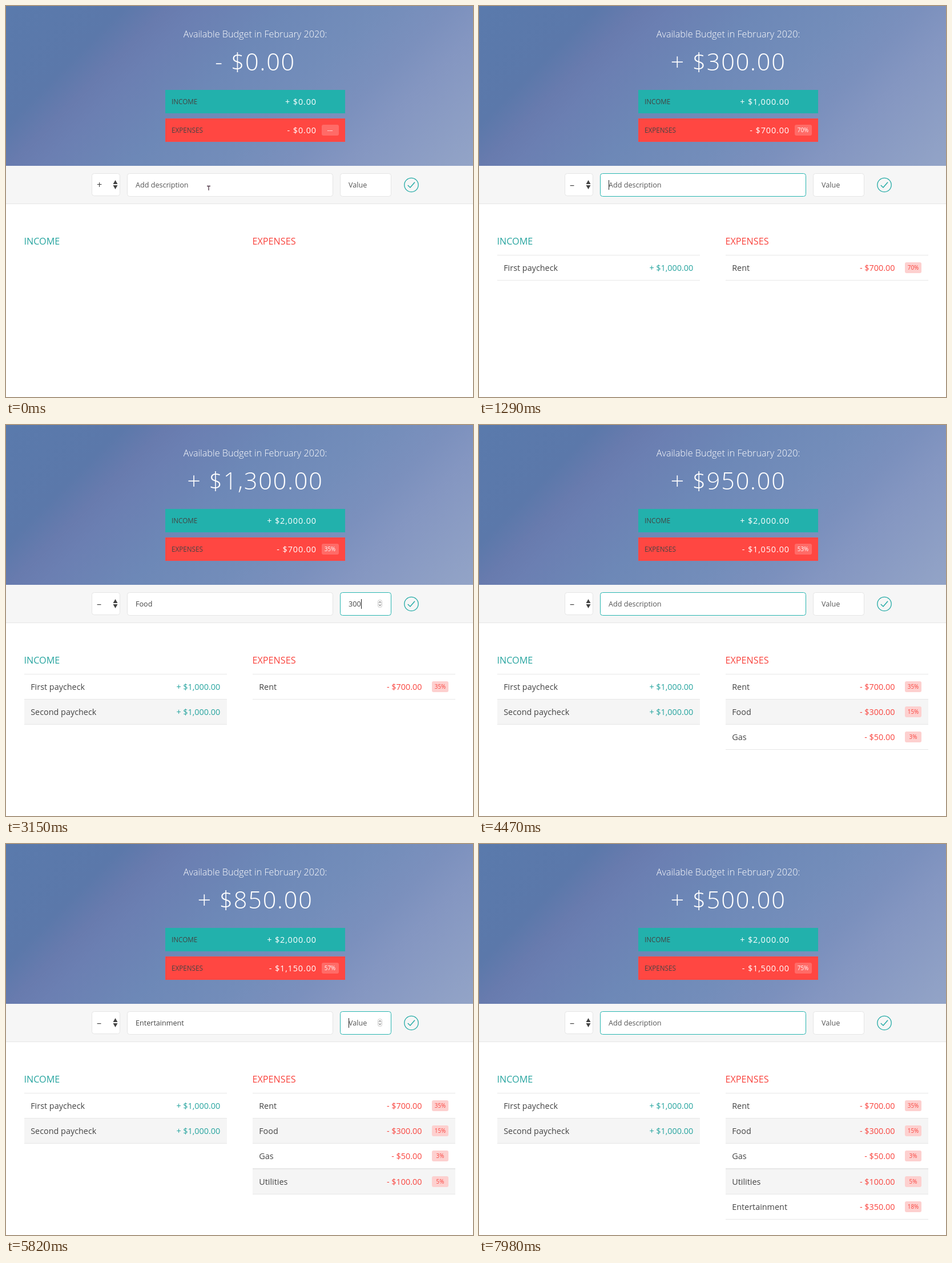
Animation of 818 by 685 pixels, one loop 8 s. Source, as an HTML page:

```html
<!DOCTYPE html>
<html lang="en">
<head>
<meta charset="utf-8">
<title>Budget</title>
<style>
* { box-sizing: border-box; }
html, body { margin: 0; width: 100%; height: 100%; overflow: hidden; background: #fff; }
body { position: relative; font: 400 14.4px/20px "Open Sans", sans-serif; color: #444; }
div, b, svg { position: absolute; white-space: pre; }
b { font-weight: 400; }
#stage { left: 0; top: 0; width: 818px; height: 685px; overflow: hidden; }
.top {
  left: 0; top: 0; width: 818px; height: 280px; color: #fff;
  background: linear-gradient(135deg, #5a7aac 0, #5b78aa 19%, #687bae 26%, #6b7fb2 31%, #6d88b7 45%, #738dba 60%, #7b90bd 71%, #8496c1 79%, #93a4c7 100%);
}
.title { left: 236.5px; width: 400px; top: 39px; text-align: center; font-size: 16.2px; font-weight: 300; }
#budget { left: 136.5px; width: 600px; top: 67px; line-height: 60px; text-align: center; font-size: 41.4px; font-weight: 300; letter-spacing: 1.8px; }
.bar { left: 279px; width: 315px; height: 41px; line-height: 41px; }
.bar .label { left: 11px; font-size: 11.7px; color: #444; }
.bar .sum { right: 50px; letter-spacing: .9px; }
.badge { width: 29px; height: 19px; line-height: 19px; border-radius: 3px; text-align: center; font-size: 9.9px; }
.bar .badge { left: 273.5px; top: 11px; width: 30px; background: #fff3; }
.form { left: 0; top: 280px; width: 818px; height: 67px; background: #f6f6f6; border-bottom: 1px solid #e5e5e5; }
.field { height: 41px; top: 293px; line-height: 39px; padding-left: 14px; background: #fff; border: 1px solid #e5e5e5; border-radius: 4.5px; font-size: 12.6px; color: #444; }
.field i { color: #555; font-style: normal; }
.field u { display: inline-block; width: 1px; height: 17px; margin-right: -1px; vertical-align: -4px; background: #222; }
.focus { border-color: #28b5b0; }
#sign { left: 150px; width: 50px; height: 40px; line-height: 38px; padding-left: 8px; font-size: 16.2px; }
#description { left: 212px; width: 361px; }
#value { left: 585px; width: 90px; }
.heading { top: 402px; font-size: 16.2px; }
.inc { color: #26a49f; }
.exp { color: #f9443e; }
.row { width: 355.5px; height: 45px; line-height: 43px; border: solid #e7e7e7; border-width: 1px 0; }
.row:nth-child(even) { background: #f5f5f5; }
.row .name { left: 11.7px; }
.row .amount { right: 11.7px; }
.row .exp.amount { right: 58.5px; }
.row .badge { right: 12px; top: 12px; background: #fdd0cf; }
#menu { left: 138px; width: 64px; height: 49px; border-radius: 5px; background: #f4f4f4; box-shadow: 0 2px 5px #0005; font-size: 14.4px; line-height: 22px; padding-top: 2px; }
#menu div { position: relative; padding-left: 21px; height: 22px; }
#menu .on { background: #3b87f7; color: #fff; }
#pointer { overflow: visible; left: 0; top: 0; width: 1px; height: 1px; }
</style>
</head>
<body>
<div id="stage">
  <div class="top">
    <div class="title">Available Budget in February 2020:</div>
    <div id="budget"></div>
    <div class="bar" style="top:147px;background:#22b1ac"><b class="label">INCOME</b><b class="sum" id="income"></b></div>
    <div class="bar" style="top:197px;background:#ff4742"><b class="label">EXPENSES</b><b class="sum" id="expenses"></b><b class="badge" id="share"></b></div>
  </div>
  <div class="form"></div>
  <div class="field" id="sign"></div>
  <div class="field" id="description"></div>
  <div class="field" id="value"></div>
  <svg width="818" height="360" style="left:0;top:0" fill="none">
    <path d="M187.5 312 191.5 305 195.5 312ZM187.5 314 191.5 321 195.5 314Z" fill="#444"/>
    <g stroke="#22aaa5" stroke-width="1.3"><circle cx="710" cy="313.5" r="12.2"/><path d="M703.8 314 708 318 716 308.8" stroke-width="1.5"/></g>
    <g id="spinner"><rect x="651.5" y="306.5" width="7" height="13" rx="3" fill="#f8f8f8" stroke="#ccc"/><path d="M653.3 311.5 655 309.3 656.7 311.5M653.3 314.5 655 316.7 656.7 314.5" stroke="#555"/></g>
  </svg>
  <div class="heading inc" style="left:31.5px">INCOME</div>
  <div class="heading exp" style="left:431.5px">EXPENSES</div>
  <div id="incRows" style="left:31.5px;top:436px"></div>
  <div id="expRows" style="left:431.5px;top:436px"></div>
  <div id="menu"></div>
  <svg id="pointer">
    <path id="beam" d="M-3-3.5H3M0-3.5V4" fill="none" stroke="#503848" stroke-width="1.3"/>
    <path id="arrow" d="M0 0V13L3 10.2 5 15 7.2 14 5.2 9.5H9.3Z" fill="#111" stroke="#fff"/>
  </svg>
</div>
<script>
const LOOP = 8000, STEP = 30;
const el = id => document.getElementById(id);
const events = [];
const add = (at, change, submit = false) => events.push({ at, change, submit });
const focus = (at, field) => add(at, s => { s.focus = field; });
const choose = (at, sign) => add(at, s => { s.sign = sign; });
const type = (at, field, text, step = STEP) =>
  [...text].forEach((c, i) => add(at + i * step, s => { s[field] += c; }));

// One form entry: description typed, value field focused, value typed, submitted.
function entry(name, nameAt, valueFocus, amount, amountAt, submitAt, step = STEP) {
  type(nameAt, 'description', name, step);
  focus(valueFocus, 'value');
  type(amountAt, 'value', String(amount), step);
  add(submitAt, s => {
    s.items.push({ name, amount, sign: s.sign });
    s.description = s.value = '';
    s.focus = 'description';
  }, true);
}

const HOVER = 6450, DELETE = 6750;
focus(30, 'description');
entry('First paycheck', 60, 480, 1000, 510, 630);
choose(900, '–');
focus(930, 'description');
entry('Rent', 950, 1040, 700, 1060, 1140, 20);
choose(1680, '+');
focus(1800, 'description');
entry('Second paycheck', 1860, 2370, 1000, 2460, 2610);
choose(2790, '–');
focus(2850, 'description');
entry('Food', 2880, 3030, 300, 3060, 3240);
entry('Gas', 3600, 3750, 50, 3810, 4050);
entry('Utilities', 4530, 4800, 100, 4830, 4950);
entry('Entertainment', 5250, 5730, 350, 5880, 6030);
add(DELETE, s => { s.items.pop(); s.focus = ''; });
focus(7170, 'description');
entry('Entertainment', 7380, 7770, 350, 7800, 7950);
events.sort((a, b) => a.at - b.at);

// Open select menus: start, end, selected sign
const menus = [[840, 900, '+'], [1590, 1680, '–'], [2700, 2790, '+']];

// Pointer moves: start, arrival, hidden at, from, to
const moves = [
  [0, 1, 60, [355, 319], [355, 319]],
  [660, 780, 930, [605, 314], [168, 313]],
  [1440, 1560, 1680, [330, 319], [168, 313]],
  [1680, 1800, 1860, [168, 291], [300, 316]],
  [2310, 2370, 2460, [300, 316], [605, 314]],
  [2610, 2700, 2790, [605, 314], [168, 313]],
  [2790, 2850, 2880, [168, 335], [300, 316]],
  [6090, 6480, 6780, [605, 314], [766, 635]],
  [6780, 7140, 7380, [766, 635], [330, 319]],
];

const clamp = x => Math.min(1, Math.max(0, x));
const ease = x => x * x * (3 - 2 * x);
const money = (n, sign) => sign + ' $' + n.toLocaleString('en-US', { minimumFractionDigits: 2 });
const percent = (n, total) => n > 0 && total > 0 ? Math.round(n / total * 100) + '%' : '---';
const total = (items, sign) => items.filter(i => i.sign === sign).reduce((sum, i) => sum + i.amount, 0);

const cache = {};
function setHTML(id, html) {
  if (cache[id] !== html) el(id).innerHTML = cache[id] = html;
}

function stateAt(t) {
  const s = { sign: '+', description: '', value: '', focus: '', items: [], last: 0, submit: false };
  for (const e of events) {
    if (e.at > t) break;
    e.change(s);
    s.last = e.at;
    s.submit = e.submit;
  }
  return s;
}

function drawField(id, placeholder, s, t) {
  const active = s.focus === id;
  const caretOn = (t - s.last + (s.submit ? 150 : 0)) % 300 < 150;
  el(id).classList.toggle('focus', active);
  setHTML(id, s[id] + (active && caretOn ? '<u></u>' : '') + (s[id] ? '' : `<i>${placeholder}</i>`));
}

function drawRows(s, income, t) {
  const row = (item, i, isExpense) => {
    const hovered = isExpense && i === 4 && t >= HOVER && t < DELETE;
    const shift = hovered ? -18 * ease(clamp((t - HOVER) / 120)) : 0;
    const move = `style="transform:translateX(${shift}px)"`;
    const kind = isExpense ? 'exp' : 'inc';
    return `<div class="row" style="top:${44.2 * i}px"><b class="name">${item.name}</b>` +
      `<b class="amount ${kind}" ${move}>${money(item.amount, isExpense ? '-' : '+')}</b>` +
      (isExpense ? `<b class="badge exp" ${move}>${percent(item.amount, income)}</b>` : '') +
      (hovered ? '<svg width="18" height="18" style="right:10px;top:13px" fill="none" stroke="#ff5049"><circle cx="9" cy="9" r="7.5"/><path d="M6 6 12 12M12 6 6 12"/></svg>' : '') +
      '</div>';
  };
  for (const [id, sign] of [['incRows', '+'], ['expRows', '–']])
    setHTML(id, s.items.filter(i => i.sign === sign).map((item, i) => row(item, i, sign === '–')).join(''));
}

function drawMenu(t) {
  const open = menus.find(m => t >= m[0] && t < m[1]);
  el('menu').style.display = open ? 'block' : 'none';
  if (!open) return;
  const [start, end, selected] = open;
  const lit = t < (start + end) / 2 ? selected : selected === '+' ? '–' : '+';
  el('menu').style.top = (selected === '+' ? 300 : 278) + 'px';
  setHTML('menu', ['+', '–'].map(c => `<div class="${c === lit ? 'on' : ''}">${c}</div>`).join(''));
}

function drawPointer(t) {
  const move = moves.find(m => t >= m[0] && t < m[2]);
  el('pointer').style.display = move ? 'block' : 'none';
  if (!move) return;
  const [start, end, , from, to] = move;
  const k = ease(clamp((t - start) / (end - start)));
  const [x, y] = from.map((v, i) => v + (to[i] - v) * k);
  const overText = y > 293 && y < 334 && (x > 212 && x < 573 || x > 585 && x < 675);
  el('beam').style.display = overText ? '' : 'none';
  el('arrow').style.display = overText ? 'none' : '';
  el('pointer').style.transform = `translate(${x}px,${y}px)`;
}

function draw(t) {
  const s = stateAt(t);
  const income = total(s.items, '+'), expenses = total(s.items, '–');
  const budget = income - expenses;
  setHTML('budget', money(Math.abs(budget), budget > 0 ? '+' : '-'));
  setHTML('income', money(income, '+'));
  setHTML('expenses', money(expenses, '-'));
  setHTML('share', percent(expenses, income));
  setHTML('sign', s.sign);
  drawField('description', 'Add description', s, t);
  drawField('value', 'Value', s, t);
  el('spinner').style.display = s.focus === 'value' ? '' : 'none';
  drawRows(s, income, t);
  drawMenu(t);
  drawPointer(t);
}

const began = performance.now();
function tick() {
  draw((performance.now() - began) % LOOP);
  requestAnimationFrame(tick);
}
tick();
</script>
</body>
</html>
```
